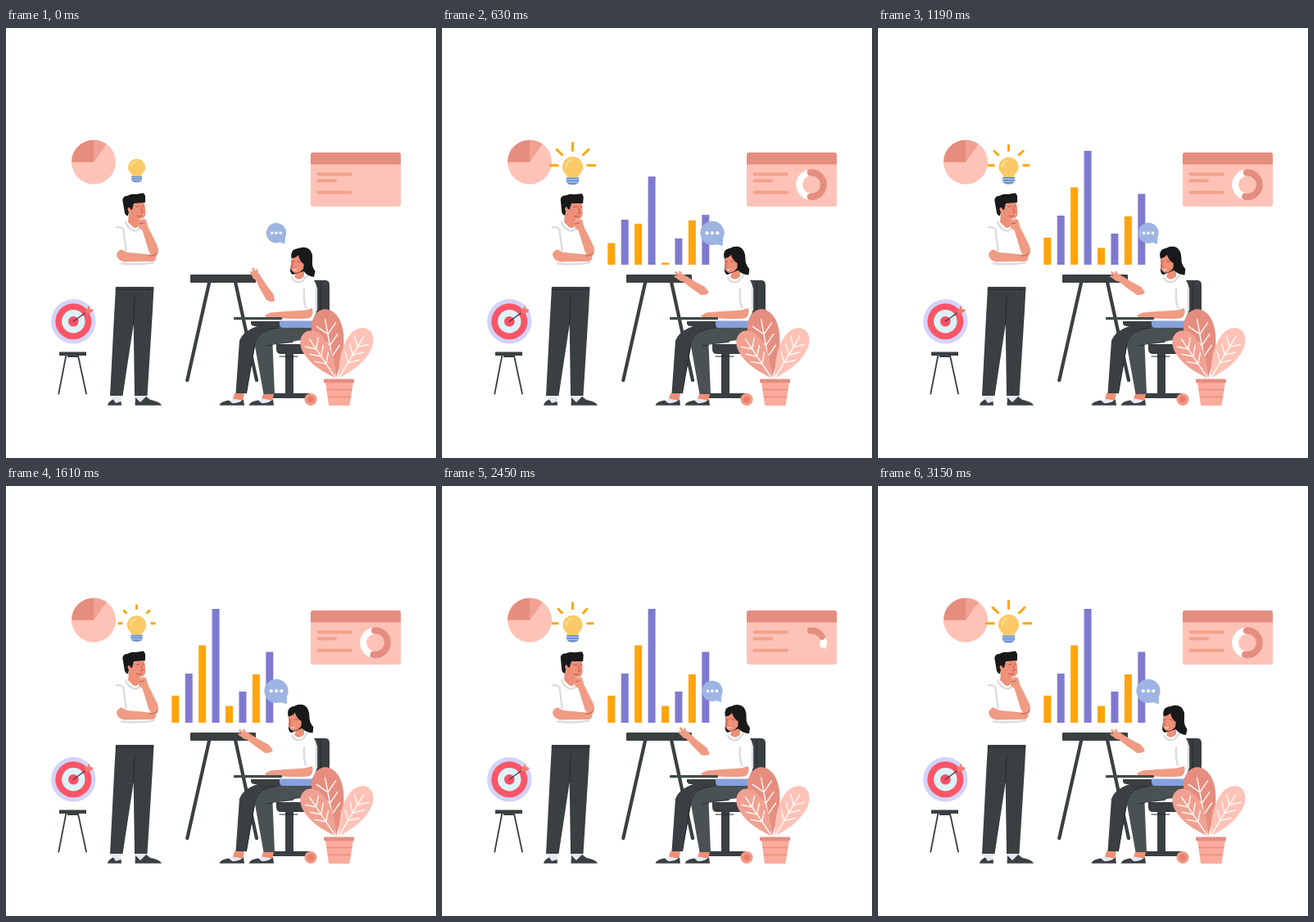
An HTML page for the animation above (3.22 s loop, 525x525 px).

```html
<!DOCTYPE html>
<html lang="en">
<head>
<meta charset="utf-8">
<title>Team planning</title>
<style>
html, body { margin: 0; width: 100%; height: 100%; overflow: hidden; background: #fff; }
svg { display: block; width: 100vw; height: 100vh; }
.ink { fill: #3a3f41; }
.skin { fill: #f09b84; }
.face { fill: #ee8f77; }
.hair { fill: #17191b; }
.dark { fill: #e58e7f; }
.mid { fill: #f0a192; }
.light { fill: #ffc2b6; }
.white { fill: #fff; }
.sock { fill: #e6e9f4; }
.line { fill: none; stroke-linecap: round; stroke-linejoin: round; }
.fold { stroke: #d9dddf; stroke-width: 2.4; }
.vein { stroke: #fff5f1; stroke-width: 1.5; }
.crease { stroke: #25292b; stroke-width: 1; }
.feature { stroke: #b0543f; stroke-width: .9; }
</style>
</head>
<body>
<svg viewBox="0 0 525 525">
  <!-- pie -->
  <circle class="light" cx="107" cy="163.7" r="27"/>
  <path class="dark" d="M107 163.7H80A27 27 0 0 1 107 136.7Z"/>
  <path class="mid" d="M107 163.7V136.7A27 27 0 0 1 122.8 141.8Z"/>

  <!-- card -->
  <rect class="light" x="372" y="152" width="110" height="66" rx="3"/>
  <path class="dark" d="M372 166.5V155Q372 152 375 152H479Q482 152 482 155V166.5Z"/>
  <path class="line" stroke="#f2a28c" stroke-width="4" d="M381.5 178.6H421M381.5 186.6H402M381.5 200.8H421"/>
  <g class="line" stroke-width="8">
    <path id="ringLight" stroke="#fff" style="stroke-linecap:butt"/>
    <path id="ringDark" stroke="#e58e7f"/>
  </g>

  <!-- target -->
  <circle cx="82.3" cy="358.3" r="27.2" fill="#d3d3fa"/>
  <circle cx="82.3" cy="358.3" r="22" fill="#fb5667"/>
  <circle cx="82.3" cy="358.3" r="14.2" fill="#dcf4f8"/>
  <circle cx="82.3" cy="358.3" r="6.3" fill="#f85065"/>
  <path class="line" stroke="#3d3f4a" stroke-width="1.4" d="M82.3 358.3L99 346"/>
  <path d="M96 347L102 338.500V343L107 344L104 347.500L98 349Z" fill="#f07a6c"/>
  <path class="ink" d="M65 395.500H98V400H88V402H75V400H65Z"/>
  <path class="line" stroke="#3a3f41" stroke-width="1.800" d="M73.300 400L64.300 446.500M88 400L98 446.500"/>

  <!-- easel and bars -->
  <path class="line" stroke="#3a3f41" stroke-width="4.200" d="M248.300 310L221.300 430M280 310L306 430"/>
  <rect class="ink" x="225" y="301" width="80" height="10" rx="1"/>
  <g id="bars"></g>

  <!-- bulb -->
  <path id="rays" class="line" stroke="#faa60f" stroke-width="3" style="stroke-linecap:butt"/>
  <g id="bulb">
    <path d="M154.300 181C154 178 149 176 149 170.300A10.600 10.600 0 0 1 170.200 170.300C170.200 176 165.200 178 165 181Z" fill="#fbca68"/>
    <path d="M153 170Q153.500 165 158 163.500" class="line" stroke="#ffe3a0" stroke-width="1.500"/>
    <path d="M153.200 181H166V185Q165 188.500 159.600 188.500Q154 188.500 153.200 185Z" fill="#6a90d0"/>
    <path class="line" stroke="#b3c8ec" stroke-width="1" d="M153.400 183H166M154 185.700H165"/>
  </g>

  <!-- standing man -->
  <path class="ink" d="M134 316H180.500L179 345L172.500 449H157L155.700 362L142.500 449H127L132 352Z"/>
  <path class="line crease" d="M155.700 362L157 328M134 319H180"/>
  <path class="white" d="M146 236L134 243L135 316H181L183 250L170 240Z"/>
  <path class="face" d="M150 226L164 228L163 240Q160 246 155 243L149 237Z"/>
  <path class="line fold" d="M135 243.500Q140 242 143.500 246L146.500 271M146 237Q149 245 156 247.500Q162 248.500 164 243M141 287.500Q160 290 180 286.500"/>
  <g id="manHead">
    <path class="face" d="M150 211H168.500L170.500 226Q170 233 163 233Q152 234 150 224Z"/>
    <path class="hair" d="M147 229L145 226L142.300 210Q143 205 148 205Q154 202 158 203L168 201.500L170 205V213L156 214L154 222L151 221L149 229Z"/>
    <path class="face" d="M151 219Q147.500 219 149 223Q150 226 153 225Z"/>
    <path class="line feature" d="M159 218.500L163 217.500M167 217.500L169 218M165 219L167 225L164.500 225.500M160 229.500Q163 231 166 229"/>
  </g>
  <path class="skin" d="M162 236Q165 232 171 234L173.500 243L184.500 265Q188 274 184 278Q178 280 174.500 273L166.500 247Q162 245 161 240Z"/>
  <path class="skin" d="M141 270.500L148 274L176 276.500Q184 276 183.500 280Q183 285 178 285L144 285.500Q135 283 135 276Q137 271 141 270.500Z"/>
  <path class="line feature" d="M175 278Q181 279 184 275M163 239L168 238"/>
  <path class="sock" d="M130.500 449H140.500L141 458H127ZM158 449H171L182 456L170 460H158Z"/>
  <path class="ink" d="M124 460.800Q125 456 131 453.500L134 458L140.500 456L141 460.800ZM157.500 460.800L158 451L164 457L171 450L176 454Q188 456 190 460.800Z"/>

  <!-- chair -->
  <path class="ink" d="M374 308H390Q395 308 395 314V366Q395 373 388 373H372ZM330 386H378V394Q378 398 372 398H336Q330 398 330 392ZM341 398H351V446H341ZM325 446H372V452H325Z"/>
  <path class="line crease" d="M384 310V370M334 401H356"/>
  <circle cx="372" cy="453.500" r="7.600" fill="#f39a85"/>
  <circle cx="372" cy="453.500" r="4" fill="#e57f6b"/>

  <!-- seated woman -->
  <path class="ink" d="M370 362L318 361Q290 367 285 382L280.500 446H293.500L304 389L350 384Z"/>
  <path d="M374 364L335 365Q306 369 303 383L314.500 447H328L325.500 386L368 380Q378 376 374 364Z" fill="#4a5153"/>
  <path class="line crease" d="M293.500 446L304 384Q308 368 333 366M325.500 387L318 388"/>
  <path class="ink" d="M299 358H340V364H304Q298 364 299 358Z"/>
  <path class="face" d="M279 446H291L289 456H276ZM314 447H327L325 456H311Z"/>
  <g id="shoe">
    <path class="sock" d="M268 457L277 452.500L290 455V460H268Z"/>
    <path class="ink" d="M260.500 460.800Q262 456 272 454.500L276 458Q283 459 290 453.500L291 460.800Z"/>
  </g>
  <use href="#shoe" x="36"/>
  <path class="white" d="M352 302L366 301Q378 304 380 320L379 347L374 358H334L335 336L322 330L337 313Z"/>
  <path d="M334 357.500H374V366H338Q333 366 334 357.500Z" fill="#86a1db"/>
  <path class="face" d="M356 294L364 295V303Q358 310 352 304Z"/>
  <path class="line fold" d="M349 305Q354 313 362 309L368 302M364 319Q363 333 366 341M379 318V344"/>
  <g id="womanHead">
    <path class="hair" d="M349 281Q347 270 356 269.500Q364 266 370 270Q375 274 374 284Q373 291 377.500 297L376 304Q368 303 363.500 297L350 301Q346 299 347.500 293Z"/>
    <path class="face" d="M349.500 279Q355 280 357 276Q361 285 364 286L363 294Q359 299.500 352.500 299Q347.500 297 347.500 290Z"/>
    <path class="hair" d="M348.500 281Q347 270 357 269.500L366 276L367 290L362 287Q358 283 357 277Q354 281 348.500 281Z"/>
    <path class="line feature" d="M349 285.500L352 285M356 285L359 286M350.500 287L348.500 291.500L350.500 292"/>
    <path class="white" d="M349.500 294Q353 296 355.500 293.500Q353 298 349.500 294Z"/>
  </g>
  <g id="arm" class="skin">
    <path d="M306 304L311 303Q318 315 326.500 325L328 333Q325 336 318 332Q311 321 305 308Z"/>
    <path d="M300 302L297.500 298L299.500 296.500L301.500 299L300.500 293L302.500 292.500L304.500 297L306 294L307.500 295V299L310 300L311 306L306 308.500L302 306Z"/>
  </g>
  <path class="skin" d="M374 342Q376 350 371 354Q365 356 337 354.500L319 354L316 351L323 347.500L334 346.500L365 344.500Z"/>
  <rect x="278" y="353" width="59" height="3.200" rx="1" fill="#414c47"/>

  <!-- bubble -->
  <g id="bubble">
    <path d="M341 256L340.500 263.500L333 261Z" fill="#9eb4e2"/>
    <circle cx="330" cy="250.300" r="12.200" fill="#9eb4e2"/>
    <path class="line" stroke="#fff" stroke-width="3.600" d="M324.700 250.300h.01M330 250.300h.01M335.300 250.300h.01"/>
  </g>

  <!-- plant -->
  <g id="leaves"></g>
  <path d="M390 432H424L419.500 461H394Z" fill="#fbab9c"/>
  <rect class="dark" x="388" y="428.500" width="37" height="4.800" rx="1"/>
  <path stroke="#e58e7f" stroke-width="1.600" d="M391.500 441.500H422.500M393 450.500H421"/>
</svg>
<script>
const STEP = 70, STEPS = 46;
const $ = id => document.getElementById(id);
const clamp = x => Math.max(0, Math.min(1, x));
const easeOut = (x, power) => 1 - (1 - clamp(x)) ** power;
const smooth = x => (x = clamp(x), x * x * (3 - 2 * x));

// Rises over the first `up` steps of a span and falls over its last `down`.
const swell = (n, span, up, down) => smooth(n / up) * smooth((span - n) / down);

function add(parent, tag, attrs) {
  const el = document.createElementNS("http://www.w3.org/2000/svg", tag);
  for (const key in attrs) el.setAttribute(key, attrs[key]);
  return parent.appendChild(el);
}

// A leaf grows upwards from its base, then leans by an angle.
function leaf(x, angle, length, half, tone) {
  const g = add($("leaves"), "g", { transform: `translate(${x} 428) rotate(${angle})` });
  const side = s => `C${s * half * .5} ${-length * .22} ${s * half} ${-length * .4} ${s * half} ${-length * .68}`
    + `C${s * half} ${-length * .88} ${s * half * .5} ${-length} 0 ${-length}`;
  add(g, "path", { class: tone, d: `M0 0${side(-1)}L0 0${side(1)}Z` });
  let veins = `M0 0V${-length * .85}`;
  for (let y = .32; y < .7; y += .16) {
    const reach = half * .62;
    veins += `M${-reach} ${-length * y - reach}L0 ${-length * y}L${reach} ${-length * y - reach}`;
  }
  add(g, "path", { class: "line vein", d: veins });
}
leaf(403, -10.5, 86, 19, "dark");
leaf(403, -34, 68, 15.5, "mid");
leaf(406, 31, 70, 16, "light");

const HEIGHTS = [33, 60, 94.5, 139, 20.5, 38, 59, 86.5];
const DELAYS = [4, 0, 7, 4.5, 8.7, 3, 0, 5.5];
const bars = HEIGHTS.map((_, i) => add($("bars"), "rect", {
  x: 202.3 + 16.43 * i, width: 9, fill: i % 2 ? "#7f7ad0" : "#ffa40a"
}));

function polar(x, y, r, deg) {
  const a = deg * Math.PI / 180;
  return `${x + r * Math.cos(a)} ${y + r * Math.sin(a)}`;
}

function arc(from, to) {
  if (to - from < .5) return "";
  const at = deg => polar(451, 191.3, 14.8, deg - 90);
  return `M${at(from)}A14.8 14.8 0 ${to - from > 180 ? 1 : 0} 1 ${at(to)}`;
}

function rays(glow) {
  let d = "";
  for (let deg = 180; glow && deg <= 360; deg += 45)
    d += `M${polar(159.5, 167.8, 17, deg)}L${polar(159.5, 167.8, 17 + 12 * glow, deg)}`;
  return d;
}

const move = (id, value) => $(id).setAttribute("transform", value);
const grow = (x, y, s) => `translate(${x} ${y}) scale(${s}) translate(${-x} ${-y})`;

function draw(n) {
  bars.forEach((bar, i) => {
    const h = HEIGHTS[i] * easeOut((n - DELAYS[i]) / (16 - DELAYS[i]), 3);
    bar.setAttribute("y", 289 - h);
    bar.setAttribute("height", h);
  });

  const beat = n % 18;
  const glow = swell(beat, 18, 10, 1.5);
  move("bulb", grow(160, 173.5, 1 + .2 * glow));
  $("rays").setAttribute("d", rays(glow));
  move("bubble", grow(330, 250.3, 1 + .2 * swell(beat, 18, 5, 4)));

  // The ring winds up and back over 33 steps.
  const turn = n % 33;
  const sweep = easeOut(Math.min(turn, 33 - turn) / 11, 2);
  const split = 195 * sweep - 4;
  $("ringLight").setAttribute("d", arc(split, 358 * sweep - 4));
  $("ringDark").setAttribute("d", arc(-4, split));

  const nod = swell(n % 26, 17, 9, 7);
  move("manHead", `translate(${.6 * nod} 0) rotate(${4 * nod} 157 236)`);
  const lean = swell(n, 40, 8, 8);
  move("womanHead", `translate(${-1.5 * lean} ${-lean}) rotate(${-6 * lean} 361 303)`);
  const drop = swell(n % 31, 31, 7, 7);
  move("arm", `translate(${-3 * drop} ${-8 * drop}) rotate(${-25 * drop} 323 330)`);
}

const begin = performance.now();
function tick() {
  draw(Math.floor((performance.now() - begin) / STEP) % STEPS);
  requestAnimationFrame(tick);
}
tick();
</script>
</body>
</html>
```
